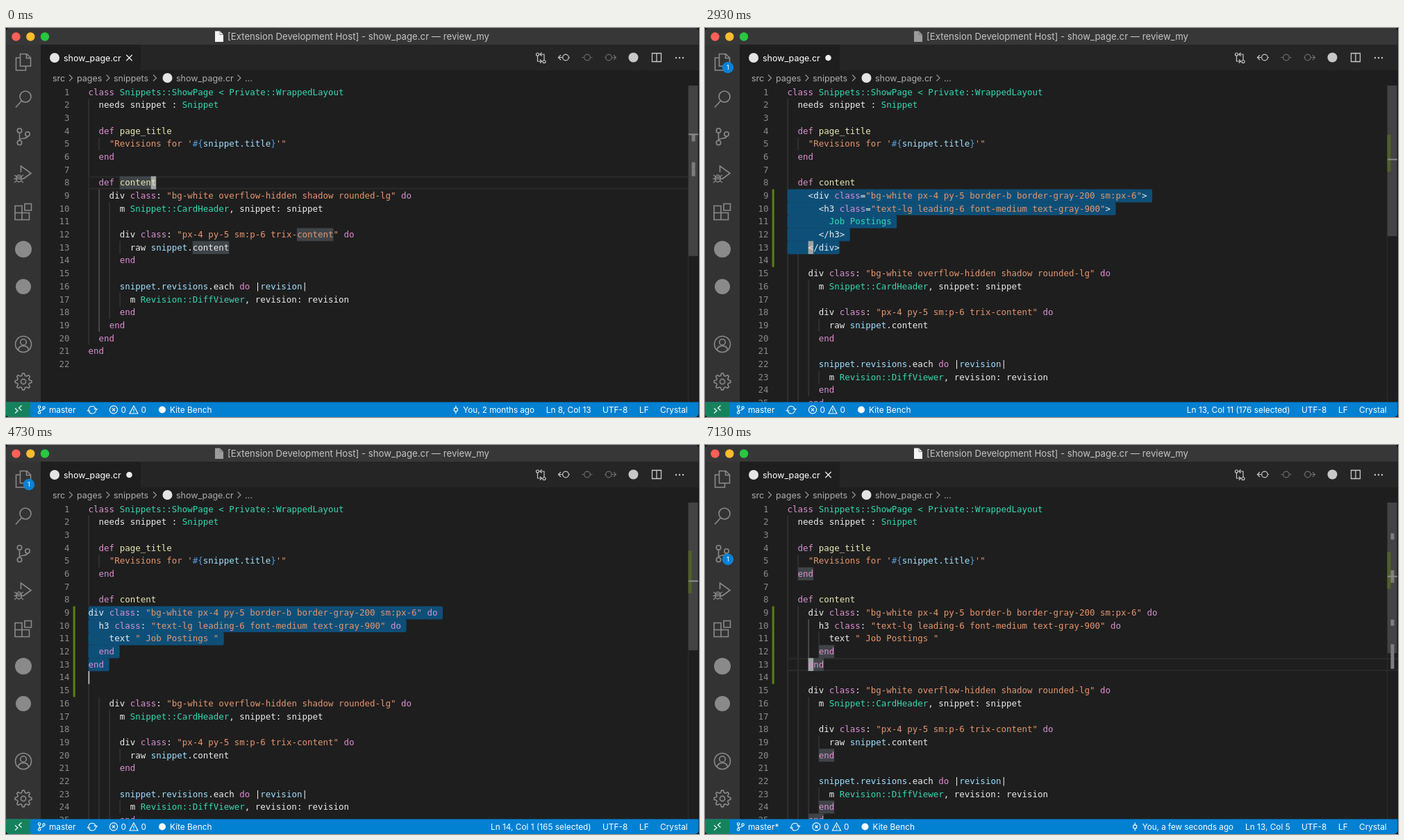
Recreate the animation shown at these times as an HTML page. Size 998 by 561 pixels, loop 7.4 s.

```html
<!DOCTYPE html>
<html lang="en">
<head>
<meta charset="utf-8">
<title>Convert HTML</title>
<style>
html, body { margin: 0; width: 100%; height: 100%; overflow: hidden; background: #101010; }
svg { display: block; width: 100%; height: 100%; }
text { white-space: pre; font-family: Inter, Roboto, sans-serif; }
.code { font: 12.47px "DejaVu Sans Mono", "Liberation Mono", monospace; }
</style>
</head>
<body>
<svg id="stage" viewBox="0 0 998 561"></svg>
<script>
const LOOP = 7400, CHAR = 7.507, LINE = 18.69, LEFT = 118.6, TOP = 83, VIEW = 457, ROW = 22.87;
const stage = document.getElementById('stage');
const measure = document.createElement('canvas').getContext('2d');

// Drawing helpers
const esc = s => s.replace(/&/g, '&amp;').replace(/</g, '&lt;');
const rect = (x, y, w, h, fill, extra = '') => `<rect x="${x}" y="${y}" width="${w}" height="${h}" fill="${fill}" ${extra}/>`;
const dot = (x, y, r, fill) => `<circle cx="${x}" cy="${y}" r="${r}" fill="${fill}"/>`;
const ring = (x, y, r, color, width = 1.2) => `<circle cx="${x}" cy="${y}" r="${r}" fill="none" stroke="${color}" stroke-width="${width}"/>`;
const line = (d, color, width = 1.2) => `<path d="${d}" fill="none" stroke="${color}" stroke-width="${width}"/>`;
const label = (x, y, s, size, fill, anchor = 'start') =>
  `<text x="${x}" y="${y}" font-size="${size}" fill="${fill}" text-anchor="${anchor}">${esc(s)}</text>`;
const span = (s, fill) => `<tspan fill="${fill}">${s}</tspan>`;
const lineTop = n => TOP + (n - 1) * LINE;
const colX = c => LEFT + c * CHAR;
function textWidth(s, size) {
  measure.font = `${size}px Inter, Roboto, sans-serif`;
  return measure.measureText(s).width;
}

// Documents
const head = `class Snippets::ShowPage < Private::WrappedLayout
  needs snippet : Snippet

  def page_title
    "Revisions for '#{snippet.title}'"
  end

  def content`.split('\n');
const tail = `    div class: "bg-white overflow-hidden shadow rounded-lg" do
      m Snippet::CardHeader, snippet: snippet

      div class: "px-4 py-5 sm:p-6 trix-content" do
        raw snippet.content
      end

      snippet.revisions.each do |revision|
        m Revision::DiffViewer, revision: revision
      end
    end
  end
end
`.split('\n');
const markup = `    <div class="bg-white px-4 py-5 border-b border-gray-200 sm:px-6">
      <h3 class="text-lg leading-6 font-medium text-gray-900">
        Job Postings
      </h3>
    </div>
`.split('\n');
const converted = `div class: "bg-white px-4 py-5 border-b border-gray-200 sm:px-6" do
  h3 class: "text-lg leading-6 font-medium text-gray-900" do
    text " Job Postings "
  end
end`.split('\n');
const doc = (...middle) => [...head, ...middle, ...tail];
const plainDoc = doc();
const markupDoc = doc(...markup);
const rawDoc = doc(...converted, '', '');
const cleanDoc = doc(...converted.map(s => '    ' + s), '');

// Syntax colours
const syntax = /("[^"]*")|\b(class|def|end|do)\b|([A-Z]\w*(?:::[A-Z]\w*)*|<(?= ))|(snippet\.revisions|snippet(?=\.)|revision(?=\|))|((?<=def )\w+)/g;
const palette = ['#e5966f', '#da90d2', '#36d9b2', '#a0e0ff', '#e8e8b4'];
function colorize(source) {
  let out = '', last = 0;
  for (const m of source.matchAll(syntax)) {
    const kind = m.slice(1).findIndex(Boolean);
    const body = esc(m[0]).replace(/#\{(.*?)\}/, (_, v) => span('#{', '#559fdf') + span(v, palette[3]) + span('}', '#559fdf'));
    out += esc(source.slice(last, m.index)) + span(body, palette[kind]);
    last = m.index + m[0].length;
  }
  return out + esc(source.slice(last));
}

const indent = s => s.search(/\S/);
function indentLevels(lines) {
  return lines.map((s, i) => {
    if (s) return indent(s) / 2;
    const above = lines.slice(0, i).reverse().find(Boolean), below = lines.slice(i + 1).find(Boolean);
    if (!above || !below) return 0;
    const a = indent(above) / 2, b = indent(below) / 2;
    return a === b ? a : Math.min(a, b) + 1;
  });
}

function drawEditor(s) {
  const { lines, cur, sel } = s;
  const pitch = VIEW * LINE / ((lines.length - 1) * LINE + VIEW);
  const mark = n => TOP + (n - 1) * pitch;
  const levels = indentLevels(lines);
  let guides = '', back = '', words = '', text = '', ruler = '';
  if (!sel) {
    back += `<rect x="119" y="${lineTop(cur) + 1}" width="885" height="${LINE - 2}" fill="none" stroke="#2b2b2b" stroke-width="1.8"/>`;
  }
  ruler += rect(982, TOP, 1, VIEW, '#2c2c2c') + rect(983, TOP, 13.5, VIEW * pitch / LINE, '#434343');
  if (s.git) {
    ruler += rect(982.5, mark(9), 5, (s.git - 8) * pitch, '#50602a');
    back += rect(96.6, lineTop(9), 3.1, (s.git - 8) * LINE, '#587f12');
  }
  lines.forEach((source, i) => {
    const n = i + 1, y = lineTop(n);
    if (sel && n >= sel[0] && n <= sel[1]) {
      const newline = n < sel[1] || sel[2] ? CHAR : 0;
      back += rect(LEFT, y, source.length * CHAR + newline, LINE + .2, s.query === null ? '#0e4f78' : '#3a3d41', 'rx="2.5"');
    }
    if (s.word) {
      for (const m of source.matchAll(s.word)) {
        words += rect(colX(m.index), y, m[0].length * CHAR, LINE, '#3f4448');
        ruler += rect(987.5, mark(n), 5, pitch, '#7d7d7d');
      }
    }
    if (y > 540) return;
    for (let k = 0; k < levels[i]; k++) {
      const active = s.guide && k === s.guide[0] && n >= s.guide[1] && n <= s.guide[2];
      guides += rect(colX(k * 2), y, 1, LINE, active ? '#707070' : '#404040');
    }
    text += `<text class="code" x="91.5" y="${y + 13.5}" fill="#8a8a8a" text-anchor="end">${n}</text>`;
    text += `<text class="code" x="${LEFT}" y="${y + 13.5}" fill="#ececec">${colorize(source)}</text>`;
  });
  ruler += rect(983, mark(cur) - 1, 14, 2, '#8c8c8c');
  const block = s.block ? rect(colX(s.block[1]), lineTop(s.block[0]), CHAR, LINE, '#a2a3a1') : '';
  const bar = s.bar ? rect(colX(s.bar[1]), lineTop(s.bar[0]), 1.6, LINE, '#c8c8c8') : '';
  return guides + back + words + block + text + bar + ruler;
}

function activityBar(s) {
  const c = '#8a8a8a', w = 1.6;
  let gear = '';
  for (let i = 0; i < 32; i++) {
    const a = (i - .5) * Math.PI / 16, r = i % 4 < 2 ? 12 : 8.8;
    gear += (i ? 'L' : 'M') + (25 + r * Math.cos(a)).toFixed(1) + ' ' + (510 + r * Math.sin(a)).toFixed(1);
  }
  const badge = s.badge ? dot(33, s.badge, 8.2, '#0782d6') + label(33, s.badge + 3.4, '1', 9.5, '#fff', 'middle') : '';
  return rect(0, 24, 50, 516, '#333') +
    line('M20.5 37.5H30L35.5 43V55H20.5ZM29.5 37.5V43.5H35.5M20 43H14.5V61H28.5V55.5', c, w) +
    ring(28, 99, 8, c, w) + line('M22.5 105L14 114.5', c, w) +
    ring(19.5, 148, 3.2, c, w) + ring(19.5, 165.5, 3.2, c, w) + ring(31, 153, 3.2, c, w) +
    line('M19.5 151.5V162M31 156.5C30 161 20 157.5 19.5 162', c, w) +
    line('M21.5 208V199L36 209.5L25 217.5', c, w) + `<ellipse cx="18.5" cy="217" rx="3.8" ry="5" fill="none" stroke="${c}" stroke-width="1.5"/>` +
    line('M12 212L15 214M25 212L22 214M11.5 217.5H25.5M12 223L15 220.5M25 223L22 220.5M15 215H22', c, 1.3) +
    line('M13 256.5H23V276.5H13ZM13 266.5H33.5V276.5H23M27 253.5H36.5V263H27Z', c, w) +
    dot(25, 319, 12, c) + dot(25, 373, 11, c) +
    ring(25, 456, 11.5, c, w) + ring(25, 453, 4.3, c, w) + line('M17.5 464C19 456.5 31 456.5 32.5 464', c, w) +
    line(gear + 'Z', c, w) + ring(25, 510, 3.6, c, w) + badge;
}

function titleAndTabs(s) {
  const c = '#c8c8c8', dim = '#6c6c6c', icon = s.dirty ? '#9c9c9c' : '#f4f4f4';
  const chevron = x => line(`M${x - 2} 67.5L${x + 2.5} 72L${x - 2} 76.5`, '#9a9a9a', 1.1);
  const crumb = (x, t) => label(x, 76.6, t, 12.5, '#adadad');
  return rect(0, 0, 998, 24, '#373738') +
    dot(14.5, 12.5, 6.2, '#ff5f57') + dot(35.3, 12.5, 6.2, '#febc2e') + dot(56, 12.5, 6.2, '#28c840') +
    `<path d="M301 4.5H308L313 9.5V20H301Z" fill="${icon}"/>` + line('M308 4.5V9.5H313', '#777', .8) +
    label(507.5, 17.3, '[Extension Development Host] - show_page.cr — review_my', 13.2, '#c4c4c4', 'middle') +
    rect(50, 24, 948, 37, '#252526') + rect(50, 24, 144, 37, '#1e1e1e') +
    dot(70, 43, 7, '#e4e4e4') + label(83, 47.6, 'show_page.cr', 12.5, '#fff') +
    (s.dirty ? dot(177.5, 43, 4.3, '#eee') : line('M173.3 38.8L181.7 47.2M181.7 38.8L173.3 47.2', '#eee', 1.3)) +
    ring(765.5, 38, 2, c) + ring(775, 48.5, 2, c) +
    line('M765.5 40V48H771M769 45.5L771.5 48L769 50.5M775 46.5V38H769.5M771.5 35.5L769 38L771.5 40.5', c) +
    ring(806, 42.5, 4.3, c) + line('M801.5 42.5H796M799 39L795.5 42.5L799 46M810.5 42.5H812', c) +
    ring(837, 42.5, 4.3, dim) + line('M829.5 42.5H832.5M841.5 42.5H844.5', dim) +
    ring(868, 42.5, 4.3, dim) + line('M862 42.5H863.5M872.5 42.5H878M875 39L878.5 42.5L875 46', dim) +
    dot(903.5, 42.5, 7, c) +
    line('M930.5 36.5H943.5V48.5H930.5ZM937 36.5V48.5', c, 1.3) +
    [965, 970, 975].map(x => dot(x, 43, 1.2, c)).join('') +
    crumb(67, 'src') + chevron(93) + crumb(102, 'pages') + chevron(146.5) + crumb(155, 'snippets') +
    chevron(214) + dot(232.5, 72, 7, '#e4e4e4') + crumb(245, 'show_page.cr') + chevron(335.5) + crumb(344, '...');
}

function statusBar(s) {
  const w = '#fff', size = 11.85, blameSize = 11.65, y = 554.8;
  const at = (x, t, anchor) => label(x, y, t, size, w, anchor);
  const blameX = s.blameEnd - textWidth(s.blame, blameSize) - 10.5;
  const blame = label(s.blameEnd, y, s.blame, blameSize, w, 'end') + ring(blameX, 550.5, 2.6, w, 1.1) +
    line(`M${blameX} 544.5V548M${blameX} 553V556.5`, w, 1.1);
  return rect(0, 539.5, 998, 22, '#0280d2') + rect(0, 539.5, 35, 22, '#16825d') +
    line('M13 548.5L17 552L13 555.5M22.5 544.5L18.5 548L22.5 551.5', w, 1.1) +
    ring(48, 546.5, 1.7, w, 1.1) + ring(48, 554.5, 1.7, w, 1.1) + ring(54.5, 547.5, 1.7, w, 1.1) +
    line('M48 548.2V552.8M54.5 549.2C54 552 49 550.5 48 552.8', w, 1.1) +
    at(62, s.star ? 'master*' : 'master') +
    `<g transform="translate(${s.star ? 5.5 : 0})">` +
    line('M119 549.5A5.2 5.2 0 0 1 129 549M129.3 552A5.2 5.2 0 0 1 119.3 552.5M126.5 549.5H131L129 552M121.5 552H117.5L119.5 549.5', w, 1.1) +
    ring(155, 550.5, 5.6, w, 1.1) + line('M153 548.5L157 552.5M157 548.5L153 552.5', w, 1.1) + at(165.5, '0') +
    line('M184 545L190 556H178ZM184 549V552.5M184 553.5V554.5', w, 1.1) + at(194.5, '0') +
    dot(225, 550.5, 5, w) + at(236, 'Kite Bench') + '</g>' +
    (s.blame ? blame : '') +
    at(842.7, s.status, 'end') + at(859, 'UTF-8') + at(912, 'LF') + at(942, 'Crystal');
}

const recent = ['Lucky - Convert HTML', 'Preferences: Configure User Snippets', 'Show Emmet Commands',
  'Emmet: Toggle Comment', 'Prettier: Create Configuration File'];
const other = ['Add Line Comment', 'Calls: Show Incoming Calls', 'Calls: Show Outgoing Calls',
  'Convert Indentation to Spaces', 'Convert Indentation to Tabs'];

function commandBox(q) {
  const blue = '#18a2fb', size = 12.65;
  const fits = t => q.length < 3 || t.toLowerCase().includes(q);
  const first = recent.filter(fits), rows = [...first, ...other.filter(fits)].slice(0, 8);
  const scrolls = rows.length === 8;
  const bold = m => `<tspan fill="${blue}" font-weight="700">${m}</tspan>`;
  const emphasize = t => {
    if (!q) return t;
    const hit = new RegExp(q, 'i');
    return t.replace(hit.test(t) ? hit : /^C|O/g, bold);
  };
  let out = rect(189.5, 25, 618.5, 44 + rows.length * ROW, '#252526', 'style="filter:drop-shadow(0 2px 4px #000)"') +
    rect(195.5, 30.5, 605.5, 26.5, '#3c3c3c', 'stroke="#0a84d8" stroke-width="1.1"') +
    rect(189.5, 64, scrolls ? 608.5 : 618.5, ROW, '#062f4a') +
    (scrolls ? rect(798, 64, 10, 20, '#214a5f') : '');
  out += label(201, 48.8, '>' + q, size, '#e0e0e0') + rect(202 + textWidth('>' + q, size), 36.5, 1.2, 15.5, '#ddd');
  rows.forEach((t, i) => {
    const y = 64 + i * ROW, opens = i === first.length, base = y + 15.8 + (opens ? .6 : 0);
    out += `<text x="201" y="${base}" font-size="${size}" fill="#ececec">${emphasize(t)}</text>`;
    if (opens) out += rect(189.5, y, 618.5, 1, '#454547');
    if (!i || opens) out += label(789, base, i ? 'other commands' : 'recently used', size, blue, 'end');
    if (t === 'Add Line Comment') {
      [['⌘', 576, 21], ['K', 602, 19], ['⌘', 632.5, 21], ['C', 660, 18.5]].forEach(([key, x, w]) => {
        out += rect(x, y + 3.9, w, 18, '#39393a', 'rx="2.5" stroke="#454546"') +
          `<text x="${x + w / 2}" y="${base}" font-size="11.2" fill="#e4e4e4" text-anchor="middle" style="font-family:Inter,'DejaVu Sans',sans-serif">${key}</text>`;
      });
    }
  });
  return out;
}

// Selection from line 9 to the end of line n of the pasted markup.
function selectTo(n) {
  const last = markup[n - 9], count = markup.slice(0, n - 8).join('\n').length;
  return { sel: [9, n], cur: n, block: [n, indent(last)], bar: [n, last.length],
    status: `Ln ${n}, Col ${last.length + 1} (${count} selected)` };
}

// Each step changes part of the state from its time on.
const ago = 'You, a few seconds ago';
const steps = [
  [0, { lines: plainDoc, cur: 8, block: [8, 12], bar: null, word: /\bcontent\b/g, guide: [1, 9, 19], sel: null, query: null,
    git: 0, badge: 0, dirty: false, star: false, status: 'Ln 8, Col 13', blame: 'You, 2 months ago', blameEnd: 761 }],
  [330, { block: null }], [600, { block: [8, 12] }], [930, { block: null }],
  [1130, { lines: markupDoc, cur: 9, block: [9, 4], word: null, guide: [2, 10, 12], dirty: true, blame: '', status: 'Ln 9, Col 5' }],
  [1200, { badge: 57 }],
  [1270, { git: 14 }],
  [1470, { block: null }], [1800, { block: [9, 4] }],
  [2070, { sel: [9, 9] }],
  [2200, selectTo(9)], [2330, selectTo(10)], [2470, selectTo(11)], [2530, selectTo(12)], [2670, selectTo(13)],
  [2930, { bar: null }],
  [3070, { query: '' }], [3130, { query: 'c' }], [3330, { query: 'co' }], [3400, { query: 'con' }],
  [3470, { query: 'conv' }], [3600, { query: 'conve' }], [3930, { query: 'conver' }], [4270, { query: 'convert' }],
  [4400, { blame: ago, blameEnd: 675 }],
  [4470, { query: null, bar: [13, 10] }],
  [4600, { lines: rawDoc, sel: [9, 13, true], cur: 14, block: null, bar: [14, 0], guide: null, blame: '', status: 'Ln 14, Col 1 (165 selected)' }],
  [4730, { git: 15 }],
  [5330, { lines: cleanDoc, sel: [9, 13], cur: 13, block: [13, 4], bar: [13, 7], guide: [2, 10, 12], git: 14, badge: 0, dirty: false,
    status: 'Ln 13, Col 8 (184 selected)' }],
  [5730, { blame: ago, blameEnd: 678 }],
  [5930, { sel: null, bar: null, status: 'Ln 13, Col 5', blameEnd: 761 }],
  [6070, { word: /\bend\b/g }],
  [6200, { block: null }],
  [6330, { star: true }],
  [6530, { block: [13, 4], badge: 165 }],
  [6870, { block: null }], [7130, { block: [13, 4] }]
];

const start = performance.now();
let shown = -1;
function frame() {
  const t = (performance.now() - start) % LOOP;
  const index = steps.findLastIndex(step => step[0] <= t);
  if (index !== shown) {
    shown = index;
    const s = Object.assign({}, ...steps.slice(0, index + 1).map(step => step[1]));
    stage.innerHTML = '<clipPath id="window"><rect width="997.5" height="561" rx="5"/></clipPath><g clip-path="url(#window)">' +
      rect(0, 0, 998, 561, '#1e1e1e') + drawEditor(s) + activityBar(s) + titleAndTabs(s) + statusBar(s) +
      (s.query === null ? '' : commandBox(s.query)) + '</g>';
  }
  requestAnimationFrame(frame);
}
frame();
</script>
</body>
</html>
```
